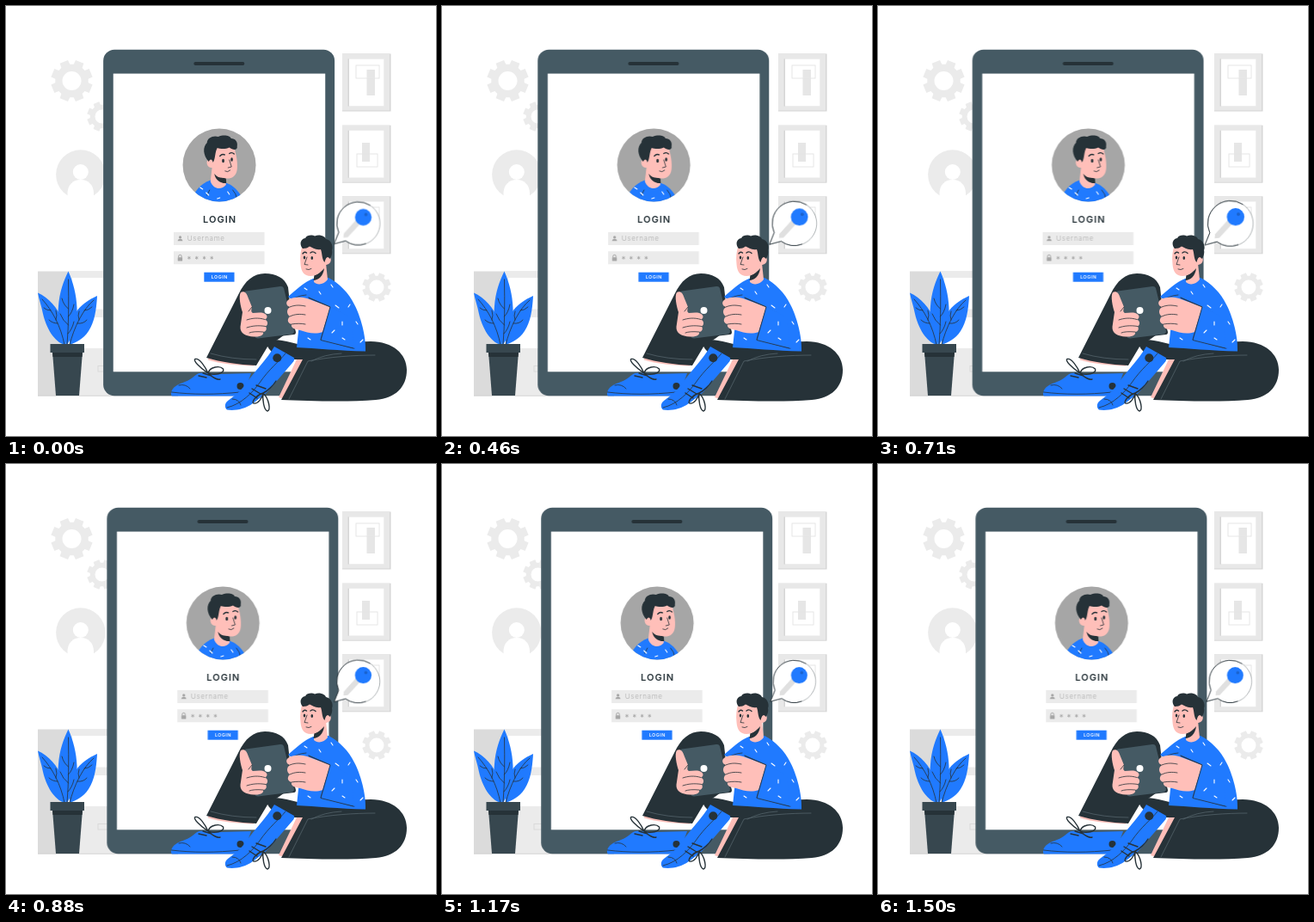
Write an HTML page that moves like this. It is 500x500 px and loops after 1540 ms.

```html
<!DOCTYPE html>
<html lang="en">
<head>
<meta charset="utf-8">
<title>Login</title>
<style>
  html, body { margin: 0; width: 100%; height: 100%; overflow: hidden; background: #fff; }
  svg { display: block; width: 100vw; height: 100vh; }
  text { font-family: Inter, "Open Sans", sans-serif; }
  #bubble { transform-box: fill-box; transform-origin: center; }
  .blue { fill: #207aff; }
  .dark { fill: #263238; }
  .slate { fill: #455a64; }
  .skin { fill: #ffbfb9; }
  .pale { fill: #ebebeb; }
  .white { fill: #fff; }
  .line { fill: none; stroke: #263238; stroke-width: .8; stroke-linecap: round; stroke-linejoin: round; }
  .lace { stroke-width: 1.4; }
  .fold { stroke: #55646b; }
  .fleck { fill: none; stroke: #fff; stroke-width: 1.1; stroke-linecap: round; }
</style>
</head>
<body>
<svg viewBox="0 0 500 500">
  <defs>
    <clipPath id="round"><circle cx="248.3" cy="185" r="42.5"/></clipPath>
  </defs>

  <g id="room">
    <g id="gears" class="pale" fill-rule="evenodd"></g>
    <circle class="pale" cx="86.8" cy="196" r="28.7"/>
    <circle class="white" cx="86.8" cy="193" r="9"/>
    <path class="white" d="M71.500 225V217C72 208 78 202 86.800 202S101.500 208 102 217V225Z"/>
    <g id="frames"></g>
    <path fill="#dbdbdb" d="M37 308.500H130V453H37Z"/>
    <path class="pale" d="M72 308.500H130V453H72Z"/>
    <path class="white" d="M77 316H130V352.500H77ZM77 362H130V398H77Z"/>
    <rect x="107" y="418.500" width="14" height="6.500" fill="none" stroke="#dadada"/>
    <path stroke="#c4c4c4" stroke-width=".7" d="M37 453.300H200"/>
  </g>

  <g id="plant">
    <path class="blue" d="M68 394C56 390 47 375 43 358C41 348 38 340 37 333.500C49 339 61 351 65 366C68 378 69 386 70 394Z"/>
    <path class="blue" d="M74 394C74 382 74 369 80 358C86 348 97 341 106 337C105 354 103 367 96 378C90 387 82 391 74 394Z"/>
    <path class="blue" d="M71 394C63 382 59 366 61 349C62 334 67 319 72.500 308.500C78 321 82 336 82.500 351C83 368 78 383 71 394Z"/>
    <path class="line" d="M72.500 318C73 345 73 370 71 394M72.500 352Q67 348 65 340M72.500 371Q66 366 63 358M72.500 361Q77 357 79 347M72 381Q77 376 79 367
      M42 341C54 354 64 373 68 394M52 354Q47 354 44 351M60 369Q54 369 50 365M58 365Q60 360 58 354
      M102 342C89 353 79 374 74 394M91 354Q96 354 100 350M83 369Q90 370 94 365M85 365Q83 360 85 355"/>
    <path fill="#37474f" d="M54 402H89L85 453H58Z"/>
    <path class="dark" d="M54 402H89L88.500 408H54.500Z"/>
    <rect x="51.500" y="393" width="39.500" height="10" fill="#37474f"/>
  </g>

  <g id="tablet">
    <rect class="slate" x="113.400" y="50.800" width="269" height="402.500" rx="13"/>
    <rect class="white" x="125" y="78.600" width="246.500" height="346.700"/>
    <path stroke="#263238" stroke-width="3.800" stroke-linecap="round" d="M220.500 67H275.700"/>

    <circle cx="248.300" cy="185" r="42.500" fill="#a6a6a6"/>
    <g clip-path="url(#round)">
      <path class="blue" d="M215 230C218 216 226 207 238 202.500L257 206C265 209 271 215 275 224V230Z"/>
      <path class="skin" d="M240 187L238 204C242 214 251 214 256 208L255 192Z"/>
      <path class="dark" d="M242.500 195C246 199.500 250 200.500 256 199.500L256.500 206C250 206.500 244 203 242.500 195Z"/>
      <path class="skin" d="M238 172L243 162L265 163C268 172 270 182 269 190C268 198 263 201 256 200.500C247 199 242 194 240 188C235 189 232 182 235 179Z"/>
      <path class="dark" d="M236 181C229 173 229 164 234 159C234 153 242 150 247 152C254 149 261 151 262 154C267 154 270 158 269 163C270 168 264 168 260 164.500C255 167 249 166 246 165C243 170 244 177 241 182C240 178 238 177 236 181Z"/>
      <path class="line" d="M260 179L262.500 187L258.500 188M255 192Q258 194 261 191"/>
      <path class="line lace" d="M249 174.500Q251.500 171.500 254.500 173M260 171.500Q263 169.500 265.500 172"/>
      <ellipse class="dark" cx="252.800" cy="180" rx="1.400" ry="2.300"/>
      <ellipse class="dark" cx="262.800" cy="178.500" rx="1.300" ry="2.200"/>
      <path class="line" d="M264 214Q268 218 269 225M237 214L234 220"/>
      <path class="fleck" d="M226 211L229 213M233 217L236 220M246 224L249 223M258 216L260 219M222 222L225 221"/>
    </g>

    <text x="248.900" y="251.500" font-size="11" font-weight="600" letter-spacing="1" text-anchor="middle" fill="#263238">LOGIN</text>
    <path class="pale" d="M195.300 263H300.800V278H195.300ZM195.300 285.300H300.800V300.300H195.300Z"/>
    <g fill="#a6a6a6">
      <circle cx="202.800" cy="268.900" r="1.600"/>
      <path d="M199.900 273.300C200 270 205.600 270 205.700 273.300Z"/>
      <rect x="200" y="292.300" width="5.400" height="4.100" rx=".5"/>
      <path fill="none" stroke="#a6a6a6" d="M201 292.500V291A1.700 1.700 0 0 1 204.400 291V292.500"/>
    </g>
    <text x="211" y="273.300" font-size="8" font-weight="300" letter-spacing=".7" fill="#b0b0b0">Username</text>
    <g id="stars" stroke="#a6a6a6" stroke-width=".8"></g>
    <rect class="blue" x="230.600" y="309.700" width="35.200" height="11"/>
    <text x="248.500" y="317.100" font-size="5.300" font-weight="600" letter-spacing=".55" text-anchor="middle" fill="#fff">LOGIN</text>
  </g>

  <g id="bubble">
    <path d="M381.800 276.300L387.200 263A24.700 24.700 0 1 1 395 272.700Z" fill="#fff" stroke="#263238" stroke-width=".35"/>
    <path class="line" d="M423 232A24.700 24.700 0 0 0 387.200 263L381.800 276.300L395 272.700A24.700 24.700 0 0 0 418 276"/>
    <path fill="#e0e0e0" d="M406.500 249.500L411 254L397.500 268.500L392.500 269L393 264.500Z"/>
    <circle class="blue" cx="415.300" cy="245.700" r="9.500"/>
    <circle cx="418.300" cy="242.700" r="1.800" fill="#1a62cc"/>
  </g>

  <g id="person">
    <!-- bent leg and its shoe -->
    <path class="blue" d="M192 450C193 443 200 440 208 437C217 434 220 428 225 427C235 426 240 429 250 428L285 427L278 447L270 453.500H193Q191.500 452 192 450Z"/>
    <path class="line" d="M192.500 449C216 452 245 452 272 449M201 441Q209 439 214 445"/>
    <circle class="dark" cx="272.500" cy="442" r="4"/>
    <path class="line lace" d="M224 430L233 432M229 427L239 430M235 427C225 420 217 412 220 410.500C225 409 232 420 235 427C237 419 249 418 252.500 422C255 427 243 430 235 427C240 432 246 435 249 434"/>
    <path class="skin" d="M236 406L289 413L288 418.500C270 418 248 416 235 411.500Z"/>
    <path class="dark" d="M233 409L270 336C278 319 288 311 301 311C314 311 324 316 328 327L333 372C325 386 306 391 303 398L291 418C270 417 250 414 233 409Z"/>
    <path class="line fold" d="M238 404Q262 411 291 411"/>

    <!-- folded leg -->
    <path class="skin" d="M338 411L349 411L326 458L317 455Z"/>
    <path class="dark" d="M301 389C316 385 338 393 350 396C380 398 405 390 424 390C450 390 466 405 466 423C466 443 453 456 430 458C395 461 350 459 320 458L345 411L336 411C320 412 306 405 301 389Z"/>
    <path class="line fold" d="M329 457L351 413C375 408 405 406 429 406M355 413Q370 405 390 404"/>
    <path class="blue" d="M312 396L335 409Q336 412 333 415L314 437C306 448 296 456 287 462C278 469 265 471 257 469.500C254 467 254 462 258 459C266 453 273 448 279 439C290 424 303 411 312 396Z"/>
    <path class="line" d="M257 467C274 463 287 449 295 438C306 422 317 414 325 404M263 457Q271 457 273 464"/>
    <circle class="dark" cx="315.300" cy="409.300" r="5"/>
    <path class="line lace" d="M286 445L296 451M291 441L302 445M283 450L292 456M299 450C290 453 285 461 288 462C293 463 298 456 299 450C298 458 300 470 304 471C308 470 306 457 299 450C304 448 311 441 314 436"/>

    <!-- shirt -->
    <path class="blue" d="M357 317C347 321 337 330 328 338L343 350L338 397C360 398 388 401 418 401.500C419 384 412 360 405 347C399 334 387 322 375 316Z"/>
    <path class="line" d="M352 339L377 350L366 388L405 398M377 350Q385 354 398 362M349 336Q338 337 332 342"/>
    <path class="fleck" d="M347 328L350 330M364 332L366 335M378 324L380 327M383 348L387 351M398 350L400 347M391 367V371M379 388L382 386M398 387L401 390M412 391L415 388M351 386L354 388M407 367L409 370"/>

    <!-- head -->
    <path class="skin" d="M359 306L358 321C362 325 370 324 374 318L372 299Z"/>
    <path class="dark" d="M358.500 313C364 312 367 308 370 305C369 314 363 319 357.500 319Z"/>
    <path class="skin" d="M344.500 279L366 277L372 291C378 289 380 297 375 300C371 302 371 300 370 301C368 308 362 314 354 314C347 314 343 309 342.500 300C341.500 292 342.500 285 344.500 279Z"/>
    <path class="dark" d="M345 282C341 278 342 271 348 270C350 266 356 266 359 267.500C365 265 371 268 372 271C378 272 381 279 379 284C380 288 378 292 376.500 294C374 290 372 292 370.500 298C367 294 368 288 366 283C360 284 356 281 353 279.500C350 282 346 282 345 282Z"/>
    <path class="line" d="M350 292L347 300.500L351 301M349 306Q352 307.500 355 305.500"/>
    <path class="line lace" d="M345 288Q347 285 349.500 287M354 287Q357 284.500 360 287.500"/>
    <ellipse class="dark" cx="347" cy="292.500" rx="1.200" ry="2.100"/>
    <ellipse class="dark" cx="355.800" cy="293" rx="1.300" ry="2.100"/>

    <!-- held device and hands -->
    <path class="dark" d="M274 334Q275 331 278 331L319 326Q322 325 323 328L337 379Q337 382 335 382L293 387Q290 387 289 384Z"/>
    <path class="slate" d="M276 335Q276 332 279 331.500L319 326Q322 325.500 323 328L335 378Q335 381 333 381.500L293 386.500Q290 386.500 289 384Z"/>
    <circle class="white" cx="304.500" cy="354" r="4"/>
    <path class="skin" d="M273 333C277 331 280 334 281.500 339L286 350C285 354 285 356 287 357C294 356 300 356 302 358.500C305 361 303 364 301 364.500C305 366 305 371 302 372.500C304 376 302 379 299 379C300 382 297 385 288 384.500C279 384 272 381 272.500 373L275 356C273 350 270 337 273 333Z"/>
    <path class="line" d="M301 364.500C293 362 286 363 280 365M302 372.500C293 371 286 372 280 374M299 379Q288 378 283 380M286 350L282 355"/>
    <path class="skin" d="M327 343C331 338 343 338 350 340L377 350L368 379C360 382 350 380 342 377C335 376 331 374 332 370C328 369 326 365 330 361C326 358 326 353 330 350C327 349 325 346 327 343Z"/>
    <path class="line" d="M330 350C337 347 343 348 348 349M330 361C336 358 342 358 348 359M332 370C338 369 343 369 348 370"/>
    <path class="blue" d="M377 349L366 389L405 398L401 362Z"/>
    <path class="line" d="M352 339.500L377 350L366 388.500L404 398"/>
    <path class="fleck" d="M391 367V371M379 380L382 377M391 386L394 388"/>
  </g>
</svg>

<script>
const LOOP = 1540;
const LEAD = 28;
const $ = id => document.getElementById(id);

function gear(cx, cy, r, hole) {
  const pts = [];
  for (let i = 0; i < 8; i++) {
    for (const [off, k] of [[-.28, .79], [-.21, 1], [.21, 1], [.28, .79]]) {
      const a = (i + .5) * Math.PI / 4 + off;
      pts.push((cx + r * k * Math.cos(a)).toFixed(1) + ' ' + (cy + r * k * Math.sin(a)).toFixed(1));
    }
  }
  return `<path d="M${pts.join('L')}ZM${cx - hole} ${cy}a${hole} ${hole} 0 1 0 ${2 * hole} 0a${hole} ${hole} 0 1 0 ${-2 * hole} 0Z"/>`;
}

const rect = (x, y, w, h, attrs) => `<rect x="${x}" y="${y}" width="${w}" height="${h}" ${attrs}/>`;

function frame(y, bar, box) {
  return rect(391, y, 56.5, 67, 'fill="#d6d6d6"') +
    rect(391, y, 55, 66, 'fill="#e8e8e8"') +
    rect(397.5, y + 6, 42, 55, 'fill="#d6d6d6"') +
    rect(399, y + 6, 40.5, 55, 'fill="#fff"') +
    rect(...bar, 'fill="#e6e6e6"') +
    rect(...box, 'fill="none" stroke="#e6e6e6"');
}

function star(x, y) {
  const arm = a => `M${x - 2 * Math.cos(a)} ${y - 2 * Math.sin(a)}L${x + 2 * Math.cos(a)} ${y + 2 * Math.sin(a)}`;
  return `<path d="${[1, 3, 5].map(n => arm(n * Math.PI / 6)).join('')}"/>`;
}

$('gears').innerHTML = gear(76.5, 87, 24.5, 11) + gear(111.5, 128.5, 17.5, 8) + gear(431, 327, 17, 8.5);
$('frames').innerHTML =
  frame(55.5, [419.5, 74, 9.5, 30], [407, 69, 27, 15]) +
  frame(138.7, [414, 159, 9, 22], [408, 172, 24, 15]) +
  frame(221.3, [404, 236, 9, 30], [409, 234, 25, 15]);
$('stars').innerHTML = [213.2, 222, 230.8, 239.5].map(x => star(x, 292.8)).join('');

function loop(id, steps, toTransform) {
  const keys = steps.map(([offset, v]) => ({ offset, transform: toTransform(v), easing: 'ease' }));
  $(id).animate(keys, { duration: LOOP, delay: -LEAD, iterations: Infinity });
}

const shake = [0, -1, 2, -4, 4, -4, 4, -4, 2, -1, 0].map((v, i) => [i / 10, v]);
const beat = [[0, 1], [.14, 1.1], [.28, 1], [.42, 1.1], [.7, 1], [1, 1]];
loop('tablet', shake, v => `translate(${v}px, 0px)`);
loop('bubble', beat, v => `scale(${v})`);
</script>
</body>
</html>
```
